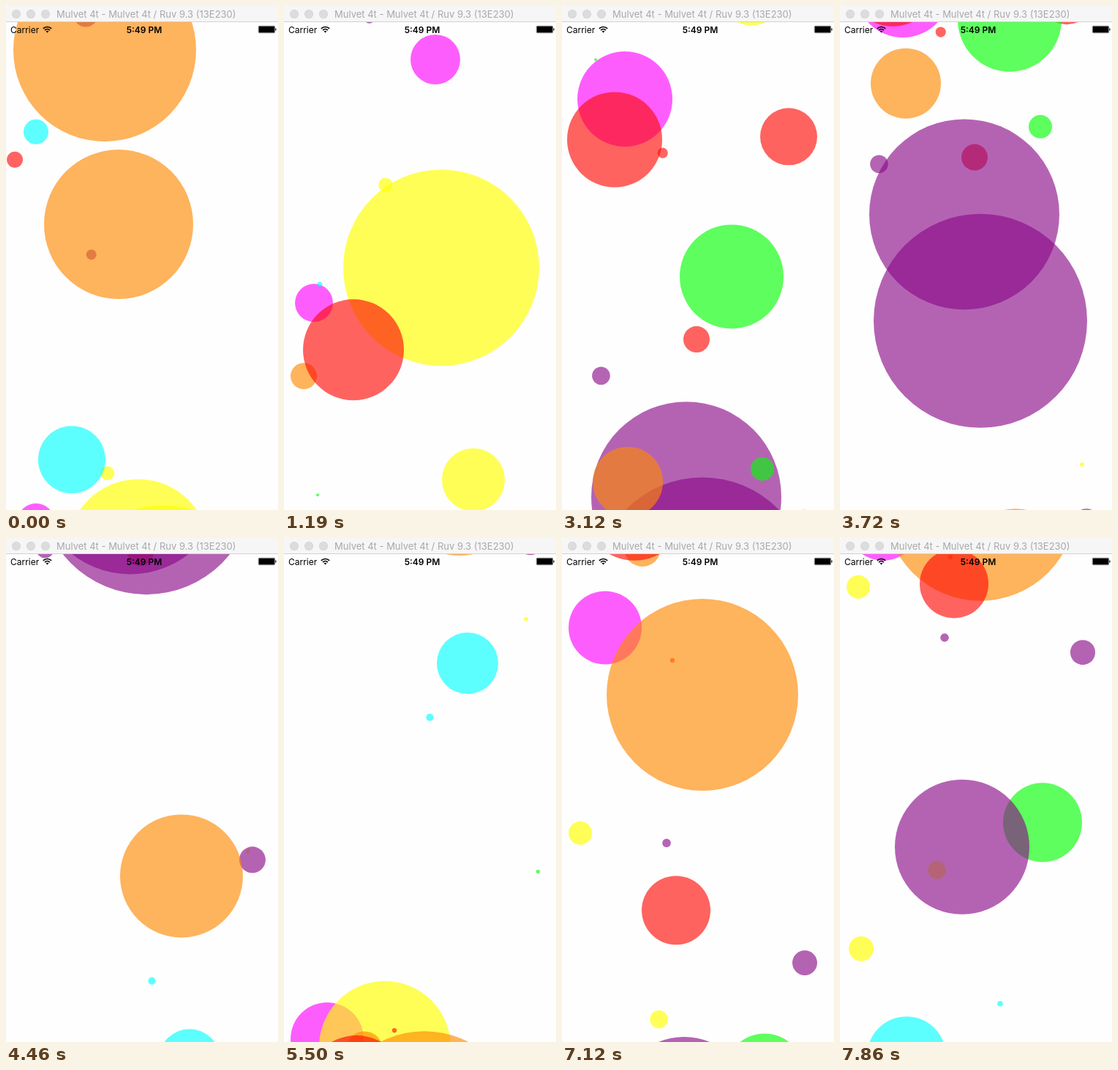
An HTML page with a canvas for the animation above (8 s loop, 372 by 688 pixels).

```html
<!DOCTYPE html>
<html lang="en">
<head>
<meta charset="utf-8">
<title>Rising bubbles</title>
<style>
html, body { margin: 0; width: 100%; height: 100%; overflow: hidden; background: #fefefe; }
canvas { display: block; }
</style>
</head>
<body>
<canvas id="stage" width="372" height="688"></canvas>
<script>
const ctx = document.getElementById('stage').getContext('2d');
const W = 372, H = 688, TOP = 22, BOTTOM = 689;
const LOOP = 8000, TICKS = 54, SPAN = 13, DOTS = 14;
const FONT = 'Inter, Roboto, sans-serif';

const RED = 'rgba(255, 10, 6, 0.63)';
const ORANGE = 'rgba(255, 136, 0, 0.63)';
const YELLOW = 'rgba(255, 255, 0, 0.655)';
const GREEN = 'rgba(0, 255, 0, 0.63)';
const CYAN = 'rgba(0, 255, 255, 0.63)';
const MAGENTA = 'rgba(255, 0, 255, 0.63)';
const PURPLE = 'rgba(138, 10, 136, 0.63)';
const COLORS = [RED, PURPLE, YELLOW, CYAN, GREEN];

const bubbles = [];

// Each bubble: x, radius, start tick and, if unusual, ticks to cross the screen.
function add(color, ...list) {
  for (const [x, r, start, span = SPAN] of list) bubbles.push({ color, x, r, start, span });
}

add(RED, [95, 69, 2.41, 13.42], [72, 65, 12.79], [310, 39, 12.61],
  [184, 18, 13.13, 18.9], [99, 70, 35.97], [156, 47, 43.07]);
add(ORANGE, [135, 125, -9.2], [154, 102, -7], [27, 18, 0.24, 20.9], [160, 93.5, 7.89, 6.3],
  [90, 48, 19.02, 8.4], [240, 84, 24.47], [110, 25, 35.53, 14], [192, 131, 34.94, 22.13]);
add(YELLOW, [181, 97, -1.26, 8], [215, 134, -1.18, 18.4], [259, 43, 3.71, 18.3],
  [138, 90, 34.14], [25, 16, 41.09, 15], [29, 17, 48.9]);
add(GREEN, [232, 71, 14.63], [274, 16, 18.97, 9], [277, 54, 46.82]);
add(CYAN, [41, 17, -8.61], [90, 46, -2.44, 9], [251, 42, 28.54], [91, 54, 51.03]);
add(MAGENTA, [41, 26, -1.79, 21.3], [207, 34, 0.75, 9.5], [86, 65, 7.71, 19.54],
  [59, 50, 32.91, 21.77]);
add(PURPLE, [109, 17, -12.1], [170, 130, 16.83, 15], [192, 146, 18.96, 13.28],
  [337, 18, 24.41], [332, 17, 44.18], [167, 92, 47.09]);

// Small dots are scattered by a seeded generator, spaced evenly in time.
let seed = 29;
function random(min, max) {
  seed = seed * 16807 % 2147483647;
  return min + (max - min) * seed / 2147483647;
}
for (let i = 0; i < DOTS; i++) {
  const start = -14 + i * (TICKS + 14) / DOTS;
  add(COLORS[i % COLORS.length], [random(12, W - 12), random(2, 13), start, random(15, 23)]);
}

// Later bubbles lie on top.
bubbles.sort((a, b) => a.start - b.start);

// cubic-bezier(0.42, 0, 0.58, 1)
function easeInOut(p) {
  let s = p;
  for (let i = 0; i < 6; i++) {
    const x = s * (1.26 + s * (-0.78 + s * 0.52));
    s -= (x - p) / (1.26 + s * (-1.56 + s * 1.56));
  }
  return s * s * (3 - 2 * s);
}

function disc(x, y, r, color) {
  ctx.fillStyle = color;
  ctx.beginPath();
  ctx.arc(x, y, r, 0, Math.PI * 2);
  ctx.fill();
}

function text(str, x, y, font, color, align = 'left') {
  ctx.font = `${font} ${FONT}`;
  ctx.fillStyle = color;
  ctx.textAlign = align;
  ctx.fillText(str, x, y);
}

function drawBubbles(tick) {
  for (const b of bubbles) {
    const p = (tick - b.start) / b.span;
    if (p <= 0 || p >= 1) continue;
    const from = BOTTOM + b.r, to = TOP - b.r;
    disc(b.x, from + (to - from) * easeInOut(p), b.r, b.color);
  }
}

function drawWifi(x, y) {
  const mid = -Math.PI / 2, a = Math.PI / 4;
  ctx.strokeStyle = ctx.fillStyle = '#000';
  ctx.lineWidth = 1.7;
  for (const r of [4.8, 8]) {
    ctx.beginPath();
    ctx.arc(x, y, r, mid - a, mid + a);
    ctx.stroke();
  }
  ctx.beginPath();
  ctx.moveTo(x, y);
  ctx.arc(x, y, 2.7, mid - a, mid + a);
  ctx.fill();
}

function drawBattery() {
  ctx.strokeStyle = ctx.fillStyle = '#000';
  ctx.lineWidth = 0.6;
  ctx.beginPath();
  ctx.roundRect(345.3, 27.3, 22.4, 9.4, 1.5);
  ctx.stroke();
  ctx.fillRect(346, 28, 21, 8);
  ctx.fillRect(368.3, 30.5, 1.2, 3);
}

function drawStatusBar() {
  text('Carrier', 6, 37, '400 12px', '#000');
  drawWifi(56.5, 36.5);
  text('5:49 PM', 189, 37, '600 12px', '#000', 'center');
  drawBattery();
}

function drawTitleBar() {
  ctx.fillStyle = '#fefefe';
  ctx.fillRect(0, 0, W, TOP);
  ctx.fillStyle = '#f6f6f6';
  ctx.beginPath();
  ctx.roundRect(0, 0, W, TOP, [4, 0, 0, 0]);
  ctx.fill();
  ctx.fillStyle = '#d2d2d2';
  ctx.fillRect(0, TOP - 1, W, 1);
  for (const x of [14, 34, 54]) {
    disc(x, 11, 6, '#d0d0d0');
    disc(x, 11, 5.4, '#dcdcdc');
  }
  text('Mulvet 4t - Mulvet 4t / Ruv 9.3 (13E230)', 69, 16, '400 13px', '#a8a8a8');
}

function draw(now) {
  const tick = Math.floor((now % LOOP) * TICKS / LOOP);
  ctx.fillStyle = '#fefefe';
  ctx.fillRect(0, 0, W, H);
  drawBubbles(tick);
  drawStatusBar();
  drawTitleBar();
}

let begin = null;
function loop(now) {
  if (begin === null) begin = now;
  draw(Math.max(0, now - begin));
  requestAnimationFrame(loop);
}
draw(0);
requestAnimationFrame(loop);
</script>
</body>
</html>
```
